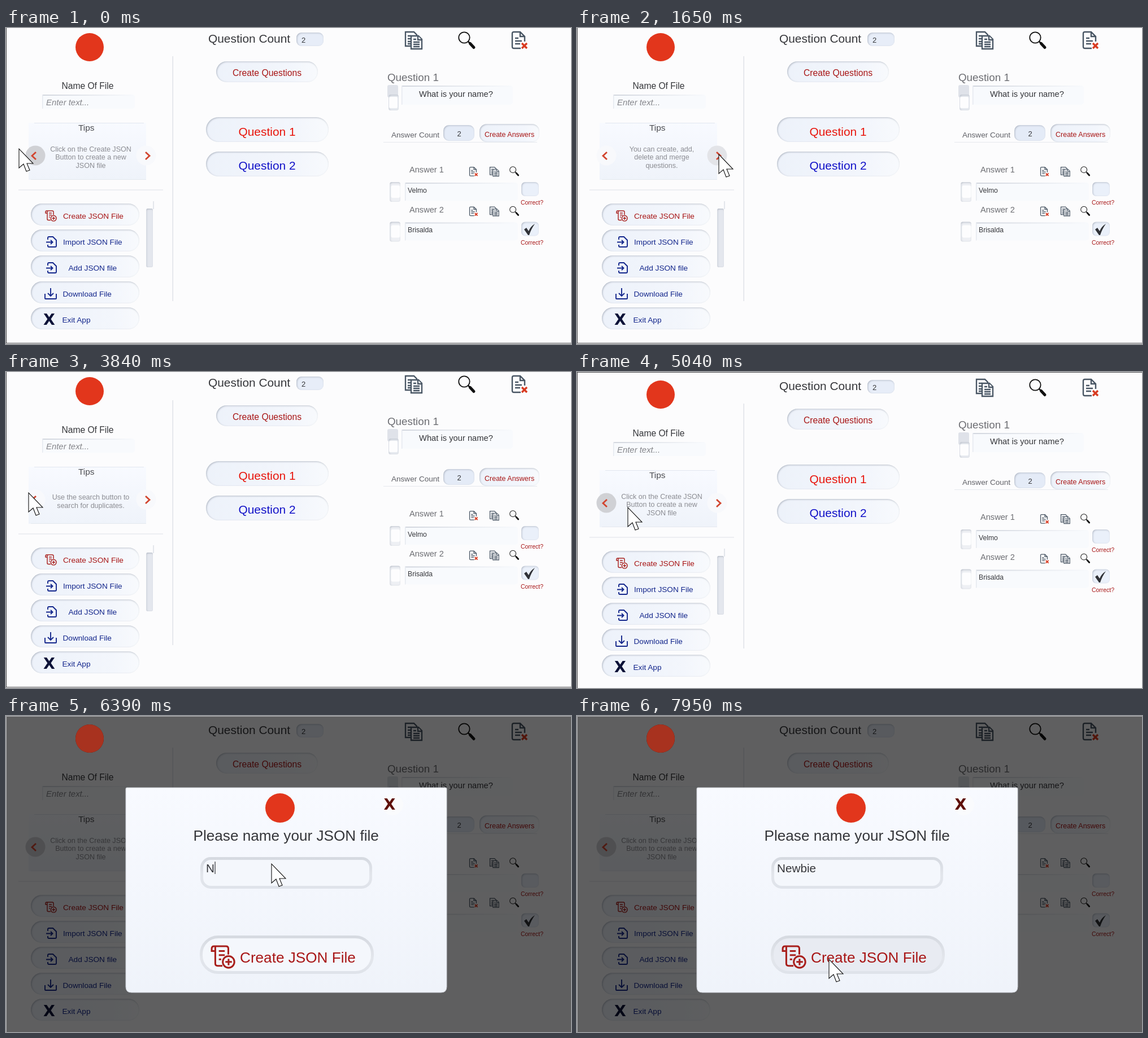
Animation of 1000 by 560 pixels, one loop 8 s. Source, as an HTML page:

```html
<!DOCTYPE html>
<html lang="en">
<head>
<meta charset="utf-8">
<title>Quiz editor</title>
<style>
  html, body { margin: 0; width: 100%; height: 100%; overflow: hidden; background: #fcfcfd; }
  svg { display: block; width: 1000px; height: 560px; font-family: "Liberation Sans", Arial, sans-serif; }
</style>
</head>
<body>
<svg viewBox="0 0 1000 560">
  <defs>
    <filter id="inset" x="-5%" y="-5%" width="110%" height="110%">
      <feFlood flood-color="#a9b0bd"/>
      <feComposite in2="SourceAlpha" operator="out"/>
      <feGaussianBlur stdDeviation="1.8"/>
      <feOffset dx="1" dy="1.4"/>
      <feComposite in2="SourceAlpha" operator="in" result="shade"/>
      <feMerge><feMergeNode in="SourceGraphic"/><feMergeNode in="shade"/></feMerge>
    </filter>
    <linearGradient id="face"><stop stop-color="#edf2fa"/><stop offset=".75" stop-color="#f3f6fc"/><stop offset="1" stop-color="#f8fafd"/></linearGradient>
    <linearGradient id="panel" x2="0" y2="1"><stop stop-color="#f8faff"/><stop offset="1" stop-color="#eff3fa"/></linearGradient>
    <linearGradient id="edge"><stop stop-color="#d2d6de"/><stop offset="1" stop-color="#d2d6de" stop-opacity="0"/></linearGradient>
    <linearGradient id="rim" x2="0" y2="1"><stop stop-color="#d6dae1"/><stop offset=".6" stop-color="#e3e6ec"/><stop offset="1" stop-color="#dfe3ea"/></linearGradient>

    <g id="copy" fill="#fafbfd" stroke="#485563" stroke-width="2.3">
      <path d="M1 1H16L21 6V26H1Z"/>
      <path d="M5 8H11M5 13H11M5 18H11M5 22H11" />
      <path d="M11 8H24L30 14V31H11Z"/>
      <path d="M23 8V15H30M15 14H20M15 19H26M15 23H26M15 27H26"/>
    </g>
    <g id="remove" fill="none" stroke-width="2.4">
      <path d="M16 30H4Q1 30 1 27V4Q1 1 4 1H15L23 9V18M15 1V9H23M6 12H12M6 17H18M6 22H15" stroke="#485563"/>
      <path d="M18 21L27 30M27 21L18 30" stroke="#d83a20" stroke-width="3.4"/>
    </g>
    <g id="search" fill="none" stroke="#111">
      <circle cx="11" cy="11" r="9.7" stroke-width="1.8"/>
      <path d="M17.500 17.500L21 21" stroke-width="2.5"/>
      <path d="M21.500 21.500L28 28.500" stroke-width="5" stroke-linecap="round"/>
    </g>
    <g id="scroll" fill="none" stroke="#a81f1c" stroke-width="1.45">
      <path d="M10 17.500H6Q4 17.500 4 15.500V1H13Q15 1 15 3V8M4 5H1V3Q1 1 3 1H5M7 5H12M7 8.500H12M7 12H9"/>
      <circle cx="15.200" cy="14.200" r="4.900"/><path d="M12.500 14.200H18M15.200 11.500V17"/>
    </g>
    <path id="import" d="M3 6V3Q3 1 5 1H12L18 7V17Q18 19 16 19H5Q3 19 3 17V15M0 10.500H11M8 7L11.500 10.500L8 14" fill="none" stroke="#14278c" stroke-width="1.9"/>
    <path id="download" d="M1 10V18Q1 19 2 19H20Q21 19 21 18V10M11 0V14M6 9L11 14L16 9" fill="none" stroke="#14278c" stroke-width="1.9"/>
  </defs>
  <g id="page"></g>
  <g id="dialog"></g>
  <path id="cursor" d="M0 0V34L8 27L13 40L19 38L14 26H25Z" fill="#fff" stroke="#111" stroke-width="1.1"/>
</svg>
<script>
const $ = id => document.getElementById(id);
const RED = '#a81616', BLUE = '#14278c', INK = '#35363a', GREY = '#6c6d72';

const text = (x, y, size, color, str, attrs = '') =>
  `<text x="${x}" y="${y}" font-size="${size}" fill="${color}" ${attrs}>${str}</text>`;
const pill = (x, y, w, h, r = h / 2, attrs = 'fill="url(#face)"') =>
  `<rect x="${x}" y="${y}" width="${w}" height="${h}" rx="${r}" filter="url(#inset)" ${attrs}/>`;
const box = (x, y, w, h, fill, attrs = '') =>
  `<rect x="${x}" y="${y}" width="${w}" height="${h}" fill="${fill}" ${attrs}/>`;
const rimmed = (x, y, w, h, r, rim, attrs) =>
  box(x + rim / 2, y + rim / 2, w - rim, h - rim, '#f4f7fc', `rx="${r}" stroke="url(#rim)" stroke-width="${rim}" ${attrs}`);
const icon = (id, x, y, scale = 1) =>
  `<use href="#${id}" transform="translate(${x} ${y}) scale(${scale})"/>`;
const cross = (x, y, color) =>
  text(x, y, 27, color, 'X', 'font-family="DejaVu Sans, sans-serif" font-weight="bold"');
const logo = (x, y, r, color = '#e2361c') => `<circle cx="${x}" cy="${y}" r="${r}" fill="${color}"/>`;
const field = (x, y, w, h) =>
  box(x, y, w, h, '#f8fafd', 'rx="5"') + box(x, y, w, 2, 'url(#edge)', 'rx="1"') + box(x, y, 1.5, h, '#e6e9ef');
const handle = (x, y) =>
  pill(x, y, 19, 35, 4, 'fill="#eef0f4"') + box(x + 2.5, y + 6, 16, 22, '#fdfdfe', 'rx="3"');

const menu = [
  ['Create JSON File', 101, RED, icon('scroll', 69, 323)],
  ['Import JSON File', 101, BLUE, icon('import', 71, 369)],
  ['Add JSON file', 110.5, BLUE, icon('import', 71, 415)],
  ['Download File', 100.5, BLUE, icon('download', 68, 461)],
  ['Exit App', 99.5, BLUE, cross(66, 526, '#0d1238')],
].map(([label, x, color, art], i) =>
  pill(44, 311 + 46 * i, 192, 39) + art + text(x, 338 + 46 * i, 13.65, color, label)).join('');

const answer = (n, name, y) =>
  text(714, y + 5, 14.6, GREY, 'Answer ' + n) +
  icon('remove', 820, y - 5, .54) + icon('copy', 856, y - 5, .54) + icon('search', 891, y - 6, .56) +
  handle(679, y + 22) + field(706, y + 23, 200, 32) + text(711, y + 40.5, 12.2, INK, name) +
  pill(912, y + 22, 31, 25, 7, 'fill="#eaf0fa"') + text(911, y + 62, 10.45, RED, 'Correct?');

$('page').innerHTML =
  box(.5, -5.5, 1010, 564, '#fcfcfd', 'stroke="#4a4a4c"') +
  logo(148, 34, 25) +
  text(98.5, 107.5, 15.6, INK, 'Name Of File') +
  field(64, 118, 164, 25) +
  text(71, 137, 14.9, '#85868b', 'Enter text...', 'font-style="italic"') +
  box(40, 168, 208, 101, 'url(#panel)') + box(50, 168, 194, 1, '#e1e6ef') + box(44, 268, 204, 1, '#e4e8ef') +
  text(128, 182, 15.4, '#4b4c50', 'Tips') +
  '<circle id="prev" cx="52" cy="226" r="17.5"/><circle id="next" cx="248" cy="226" r="17.5"/>' +
  '<path d="M53 220L46 226.500L53 233M247 220L254 226.500L247 233" fill="none" stroke="#d2452f" stroke-width="2.800"/>' +
  '<g id="tip"></g>' +
  box(22, 286.5, 256, 1, '#dfe2e8') + box(294.5, 50, 1.5, 434, '#dfe2e8') + menu +
  pill(248, 320, 12, 104, 3, 'fill="#e4e7ee"') + box(260, 307, 2, 14, '#e3e6ec') +
  text(358, 26, 20.9, INK, 'Question Count') + pill(514, 8, 48, 24, 9, 'fill="#e7edf8"') + text(523, 25.5, 13, INK, 2) +
  pill(372, 59, 180, 37) + text(401, 85, 15.7, RED, 'Create Questions') +
  pill(354, 158, 217, 44) + text(411.5, 190.5, 20.9, '#e8150c', 'Question 1') +
  pill(354, 219, 217, 44) + text(411.5, 251, 20.9, '#1212c8', 'Question 2') +
  icon('copy', 706, 6) + icon('search', 800, 6) + icon('remove', 895, 6) +
  text(675, 94, 18.8, GREY, 'Question 1') +
  box(675, 101, 19, 22, '#dfe2e9', 'rx="3"') + pill(677, 118, 18, 28, 4, 'fill="#e6e9ef"') + box(678, 122, 15, 20, '#fdfdfe', 'rx="2"') +
  field(700, 102, 197, 34) + text(731, 121.5, 14.73, INK, 'What is your name?') +
  text(682, 193.5, 13.55, '#606167', 'Answer Count') + pill(774, 172, 55, 28, 10, 'fill="#e4ebf7"') +
  text(798.5, 191.5, 13, INK, 2) + pill(838, 170, 106, 32, 13) + text(847, 193, 12.5, RED, 'Create Answers') +
  box(668, 202, 272, 1, '#e6e9ee') +
  answer(1, 'Velmo', 251) + answer(2, 'Brisalda', 321.5) +
  '<path d="M917 357L921 354L925 360Q928 352 936 347Q929 357 926 367H924Z" fill="#2f3136"/>';

$('dialog').innerHTML =
  box(0, 0, 1000, 560, '#000', 'opacity=".62"') +
  '<path d="M.5 560V.5H1000" fill="none" stroke="#b4b4b6"/>' +
  logo(148, 40, 25, '#a8321f') +
  '<path d="M214 127H778Q780 127 780 129V480Q780 490 770 490H222Q212 490 212 480V129Q212 127 214 127Z" fill="url(#panel)" stroke="#c9ccd3"/>' +
  logo(485, 163, 26) +
  '<circle cx="684" cy="157" r="19" fill="#fafbfd"/>' + cross(668.5, 166, '#5e0f08') +
  text(331.5, 221, 26.15, INK, 'Please name your JSON file') +
  rimmed(344, 250, 304, 56, 16, 5) +
  text(352, 276.5, 21.1, '#85868b', 'Enter text...', 'id="hint" font-style="italic"') +
  text(354, 276.5, 20.7, INK, '', 'id="typed"') + box(0, 258, 1.2, 22, INK, 'id="caret"') +
  rimmed(343, 389, 308, 68, 30, 5, 'id="confirm"') + icon('scroll', 362, 406, 2.1) +
  text(414, 436.5, 26.15, RED, 'Create JSON File');

const tips = [
  ['Click on the Create JSON', 'Button to create a new', 'JSON file'],
  ['Use the search button to', 'search for duplicates.'],
  ['You can create, add,', 'delete and merge', 'questions.'],
].map(lines => lines.map((line, i) =>
  text(150, 240.5 + (i - lines.length / 2) * 14.5, 12.55, '#8b8c92', line, 'text-anchor="middle"')).join(''));

// Each entry: time, then the value that holds from there on.
const tipSteps = [[0, 0], [1080, 1], [1500, 2], [3660, 1], [4470, 0]];
const keyTimes = [6330, 6450, 6540, 6630, 6750, 6840];
const path = [
  [30, 23, 214], [690, 251, 224], [2700, 251, 224], [3420, 40, 214], [4920, 40, 214],
  [5040, 90, 240], [5280, 140, 333], [5760, 140, 333], [6090, 470, 262], [7200, 470, 262], [7740, 446, 431],
];

function cursorAt(t) {
  const i = path.findIndex(k => k[0] > t);
  if (i < 0) return path[path.length - 1].slice(1);
  if (i === 0) return path[0].slice(1);
  const [a, b] = [path[i - 1], path[i]];
  const p = (t - a[0]) / (b[0] - a[0]), e = p * p * (3 - 2 * p);
  return [a[1] + (b[1] - a[1]) * e, a[2] + (b[2] - a[2]) * e];
}

let shownTip = -1;
function draw(now) {
  const t = now % 8000;
  $('page').setAttribute('transform', `translate(0 ${t >= 4950 ? 6 : 0})`);
  $('cursor').setAttribute('transform', `translate(${cursorAt(t)})`);

  const tip = tipSteps.filter(s => s[0] <= t).pop()[1];
  if (tip !== shownTip) $('tip').innerHTML = tips[shownTip = tip];
  $('prev').setAttribute('fill', t < 1050 || t >= 4440 ? '#d0d1d5' : '#f8f9fc');
  $('next').setAttribute('fill', t >= 1050 && t < 3630 ? '#e3e4e8' : '#f8f9fc');

  $('dialog').style.display = t >= 5340 ? '' : 'none';
  const count = keyTimes.filter(k => k <= t).length;
  const typing = count > 0 && t < 7050;
  $('typed').textContent = 'Newbie'.slice(0, count);
  $('hint').style.display = count ? 'none' : '';
  $('caret').style.display = typing ? '' : 'none';
  if (typing) $('caret').setAttribute('x', 354.5 + $('typed').getComputedTextLength());
  $('confirm').setAttribute('fill', t >= 7800 ? '#e8ebf2' : '#f4f7fc');
  requestAnimationFrame(() => draw(performance.now()));
}
draw(performance.now());
</script>
</body>
</html>
```
